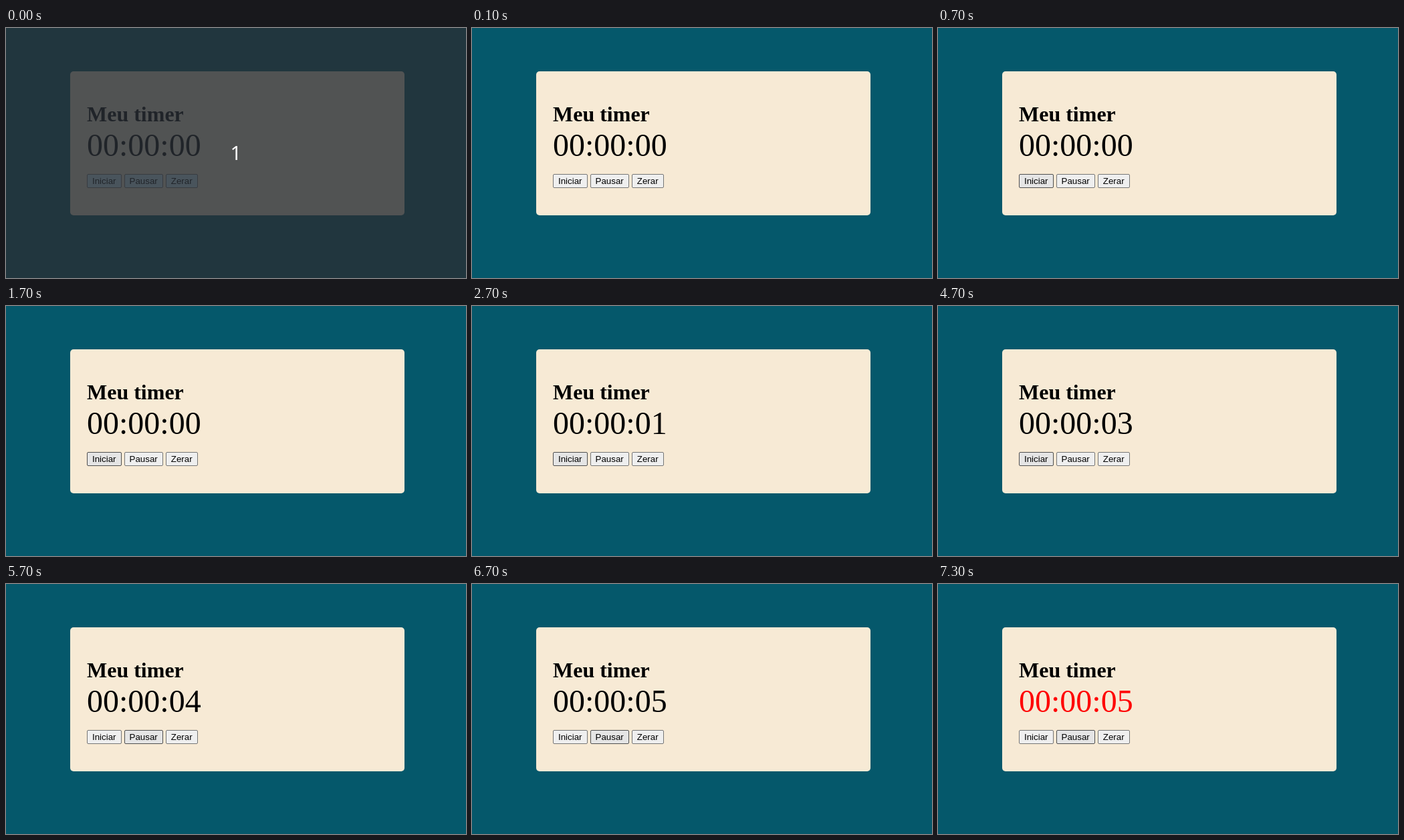
Write an HTML page that moves like this. It is 688 by 375 pixels and loops after 8000 ms.

```html
<!DOCTYPE html>
<html lang="pt">
<head>
<meta charset="utf-8">
<title>Meu timer</title>
<style>
  html, body { margin: 0; width: 100%; height: 100%; overflow: hidden; background: #05586b; }
  body > div, .card > * { position: absolute; margin: 0; white-space: nowrap; }
  .card { left: 96px; top: 65px; width: 500px; height: 216px; border-radius: 5px;
    background: #f7ead5; color: #000; font-family: "Liberation Serif", "Times New Roman", serif; }
  .card > * { left: 25px; }
  h1 { top: 46px; font-size: 32px; line-height: 36px; }
  #clock { top: 84px; font-size: 48px; line-height: 53px; }
  .buttons { top: 154px; display: flex; gap: 4px; }
  .buttons span { box-sizing: border-box; height: 21px; padding: 2px 7px; border: 1px solid #767676;
    border-radius: 2px; background: #efefef;
    font: 13.3333px/15px "Liberation Sans", Arial, sans-serif; }
  .buttons .hover { background: #e5e5e5; border-color: #4f4f4f; }
  .buttons .press { background: #f5f5f5; border-color: #8d8d8d; }
  .dim .buttons span { background: #cdf0ff; }
  #overlay { inset: 0; background: rgba(41, 45, 52, .8); }
  #overlay span { position: absolute; left: 0; width: 688px; top: 167px; text-align: center;
    color: #fff; font: 29.333px/40px "Noto Sans", sans-serif; }
</style>
</head>
<body>
<div class="card">
  <h1>Meu timer</h1>
  <div id="clock">00:00:00</div>
  <div class="buttons"><span id="start">Iniciar</span><span id="pause">Pausar</span><span>Zerar</span></div>
</div>
<div id="overlay"><span>1</span></div>
<script>
  const LOOP = 8000;
  const [clock, start, pause, overlay] =
    ["clock", "start", "pause", "overlay"].map(id => document.getElementById(id));

  // Pointer state of a button: over it from enter to leave, held down from down to up
  function state(t, enter, down, up, leave) {
    if (t < enter || t >= leave) return "";
    return t >= down && t < up ? "press" : "hover";
  }

  function draw(t) {
    const intro = t < 100;
    overlay.style.display = intro ? "block" : "none";
    document.body.className = intro ? "dim" : "";
    const seconds = Math.min(5, Math.max(0, Math.floor((t - 1700) / 1000)));
    clock.textContent = "00:00:0" + seconds;
    clock.style.color = t >= 7300 ? "#f00" : "#000";
    start.className = state(t, 700, 1500, 1700, 5400);
    pause.className = state(t, 5500, 7100, 7300, LOOP);
  }

  const origin = performance.now();
  function tick() {
    draw((performance.now() - origin) % LOOP);
    requestAnimationFrame(tick);
  }
  tick();
</script>
</body>
</html>
```
